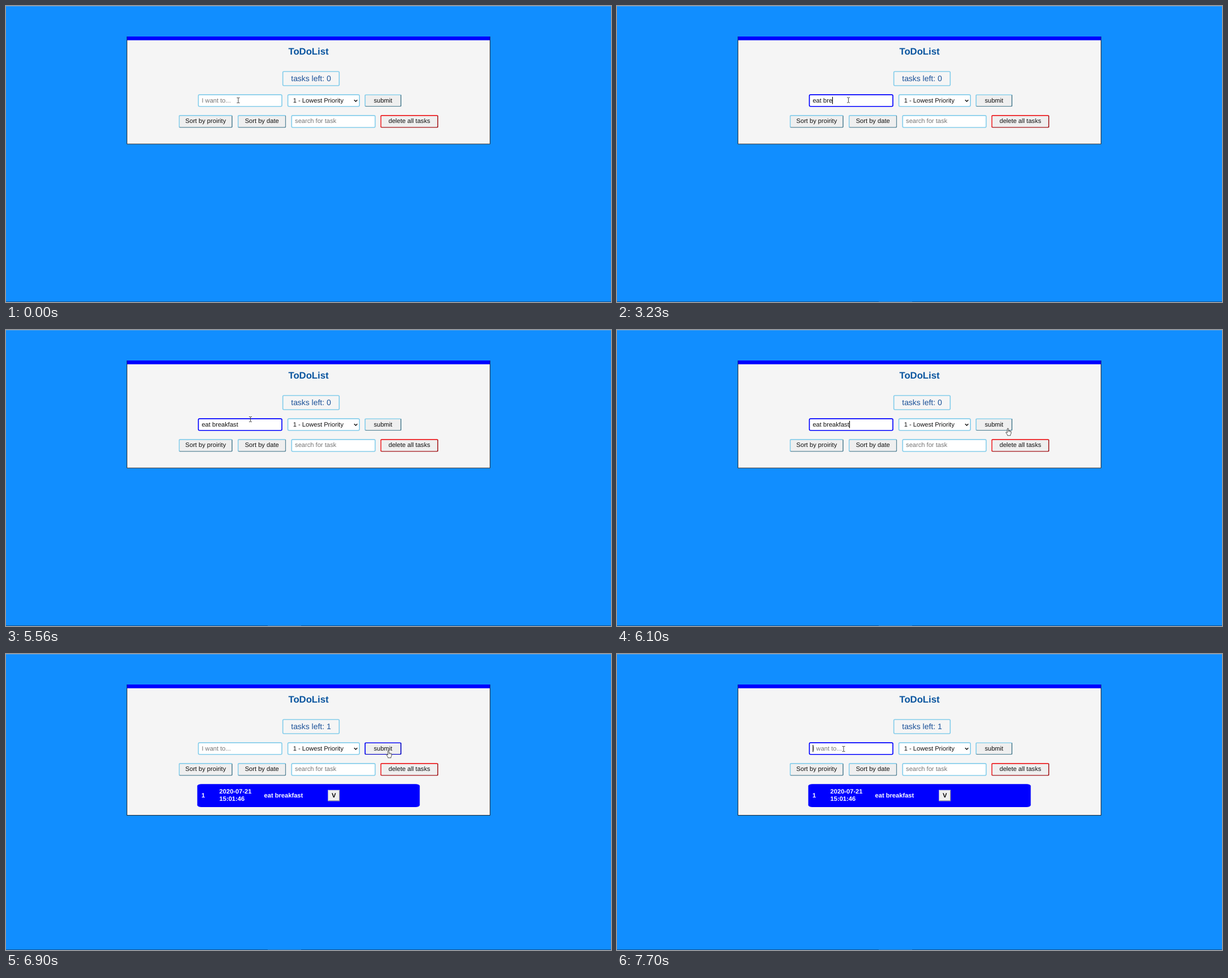
Write an HTML page that moves like this. It is 1068 px wide and 524 px high and loops after 8000 ms.

```html
<!DOCTYPE html>
<html lang="en">
<head>
<meta charset="utf-8">
<title>Task list</title>
<style>
  html, body { margin: 0; width: 100%; height: 100%; overflow: hidden; background: #118eff; }
  /* The page is laid out 1920 wide and scaled down to the stage. */
  #page {
    position: absolute; left: 0; top: 0; width: 1920px; height: 942px;
    transform: scale(.55625); transform-origin: 0 0;
    font: 20px/34px "Liberation Sans", Arial, sans-serif; color: #111;
    text-rendering: geometricPrecision;
  }
  #page div { position: absolute; box-sizing: border-box; white-space: pre; }
  #card {
    left: 383px; top: 97px; width: 1154px; height: 343px;
    background: #f5f5f5; box-shadow: inset 0 0 0 1.8px #1a2733;
  }
  #card.tall { height: 417px; }
  #card::before { content: ""; position: absolute; left: 1px; right: 1px; top: 0; height: 12px; background: #00f; }
  #title {
    left: 384px; top: 125px; width: 1152px; text-align: center;
    font-size: 30px; line-height: 40px; font-weight: bold; color: #0a559f;
  }
  #page #left { left: 877px; top: 207px; width: 182px; height: 48px; font-size: 25px; line-height: 42px; color: #1a5097; }
  .box { height: 40px; border: 3px solid #87ceeb; border-radius: 5px; text-align: center; }
  .row1 { top: 281px; }
  .row2 { top: 347px; height: 41px; line-height: 35px; }
  .field { background: #fff; text-align: left; padding-left: 9px; }
  .field.focus { border-color: #00f; }
  .field.fade { border-color: #79b7f2; }
  .btn { background: #efefef; border-color: #87ceeb #568497 #568497 #87ceeb; }
  .btn.focus { border-color: #0000f5 #0000c4 #0000c4 #0000f5; }
  .btn.press { border-color: #0808c8; }
  .btn.red { border-color: #ee1c20 #a01014 #a01014 #ee1c20; }
  .hint { color: #757575; }
  #caret { position: absolute; top: 5px; width: 2px; height: 23px; background: #000; }
  #task {
    left: 607px; top: 414px; width: 706px; height: 73px; background: #00f;
    border-radius: 13px / 6px; color: #fff; font-weight: bold; line-height: 23px;
  }
  #task .done {
    left: 415px; top: 19px; width: 37px; height: 35px; line-height: 31px; text-align: center;
    background: #efefef; color: #000; border: 2px solid; border-color: #ddd #888 #888 #ddd;
  }
  #over { position: absolute; left: 0; top: 0; }
</style>
</head>
<body>
<div id="page">
  <div id="card"></div>
  <div id="title">ToDoList</div>
  <div id="left" class="box">tasks left: <span id="count">0</span></div>

  <div id="want" class="box row1 field" style="left:609px;width:268px"><span id="typed"></span><i id="caret"></i><span id="hint" class="hint">I want to...</span></div>
  <div class="box row1 field" style="left:893px;width:230px;padding-left:15px">1 - Lowest Priority</div>
  <div id="submit" class="box row1 btn" style="left:1138px;width:117px">submit</div>

  <div class="box row2 btn" style="left:548px;width:171px">Sort by proirity</div>
  <div class="box row2 btn" style="left:735px;width:154px">Sort by date</div>
  <div class="box row2 field hint" style="left:905px;width:268px">search for task</div>
  <div class="box row2 btn red" style="left:1188px;width:184px">delete all tasks</div>

  <div id="task">
    <div style="left:13px;top:25px">1</div>
    <div style="left:70px;top:13px">2020-07-21
15:01:46</div>
    <div style="left:212px;top:25px">eat breakfast</div>
    <div class="done">V</div>
  </div>
</div>

<svg id="over" width="1068" height="524" viewBox="0 0 1068 524">
  <path d="M0 .5H1068" stroke="#4f9fe6"/>
  <path d="M0 523.5H1068" stroke="#0d4f8f"/>
  <path id="mark" d="M462 523.5H521" stroke="#2f74b4"/>
  <path d="M614.6 166.2L617.4 169L620.2 166.2" fill="none" stroke="#111" stroke-width="1.5"/>
  <g id="beam" fill="none" stroke="#444" stroke-width="1">
    <path d="M-2.5 -4.5H-.7L0 -4L.7 -4.5H2.5M0 -4V4M-2.5 4.5H-.7L0 4L.7 4.5H2.5"/>
  </g>
  <g id="arrow" fill="#fff" stroke="#111" stroke-width=".7" stroke-linejoin="round">
    <path d="M0 0V10.3L2.4 8.1L4 11.8L5.6 11.1L4 7.5H7.3Z"/>
  </g>
  <g id="hand" fill="#fff" stroke="#222" stroke-width=".8" stroke-linejoin="round">
    <path d="M-1 .6Q0 -.6 1 .6V4.4Q2 3.7 2.7 4.8Q3.8 4.2 4.4 5.3Q5.6 4.9 5.8 6.2V8.8L4.6 11.2V12.8H-.8V11.4L-3.4 7.8Q-3.6 6.4 -2.4 6.6L-1 8Z"/>
    <path d="M1 4.4V6.6M2.7 4.8V6.8M4.4 5.3V7" fill="none" stroke-width=".5"/>
  </g>
</svg>

<script>
const $ = id => document.getElementById(id);
const LOOP = 8000;
const PHRASE = "eat breakfast";

// Times at which each letter of the phrase appears.
const keys = [500, 1560, 1630, 1760, 2100, 2300, 3230, 3630, 3760, 4360, 4560, 4700, 4760];
// Caret toggles, starting with "on".
const blinks = [500, 900, 1500, 2760, 3230, 4300, 4360, 5300, 5830, 6360, 7700];
// Pointer stops: time, x, y, shape.
const stops = [
  [0, 410, 167, "beam"], [500, 408.5, 166.5, "beam"],
  [5360, 429, 159, "beam"], [5560, 431.5, 158, "beam"], [5630, 452, 161, "beam"],
  [5700, 505, 170, "arrow"], [5760, 565, 179, "arrow"], [5830, 626, 184, "arrow"],
  [5900, 668, 184, "arrow"], [5960, 692, 180, "arrow"], [6030, 694, 176, "hand"],
  [6100, 690, 174, "hand"], [6430, 687, 174, "hand"], [6500, 682, 173, "hand"],
  [6560, 677, 172, "hand"], [6630, 675, 171, "hand"],
  [7100, 668, 173, "hand"], [7160, 641, 177, "hand"], [7230, 585, 178, "arrow"],
  [7300, 520, 178, "arrow"], [7360, 462, 175, "beam"], [7430, 425, 171, "beam"],
  [7500, 408, 169, "beam"], [7560, 400, 168, "beam"]
];
const stopTimes = stops.map(s => s[0]);

const passed = (list, t) => list.filter(v => v <= t).length;
const show = (id, on) => { $(id).style.display = on ? "" : "none"; };

function draw(t) {
  const added = t >= 6900;
  const text = added ? "" : PHRASE.slice(0, passed(keys, t));
  $("typed").textContent = text;
  show("hint", !text);
  show("caret", passed(blinks, t) % 2);
  show("task", added);
  show("mark", t >= 500);
  $("count").textContent = added ? 1 : 0;
  $("card").classList.toggle("tall", added);

  const want = $("want").classList, submit = $("submit").classList;
  want.toggle("focus", (t >= 500 && t < 6830) || t >= 7700);
  want.toggle("fade", t >= 6830 && !added);
  submit.toggle("press", t >= 6830 && !added);
  submit.toggle("focus", added && t < 7700);

  const [, x, y, shape] = stops[passed(stopTimes, t) - 1];
  for (const id of ["beam", "arrow", "hand"]) show(id, id === shape);
  $(shape).setAttribute("transform", `translate(${x} ${y})`);
}

const start = performance.now();
function tick() {
  draw((performance.now() - start) % LOOP);
  requestAnimationFrame(tick);
}
tick();
</script>
</body>
</html>
```
